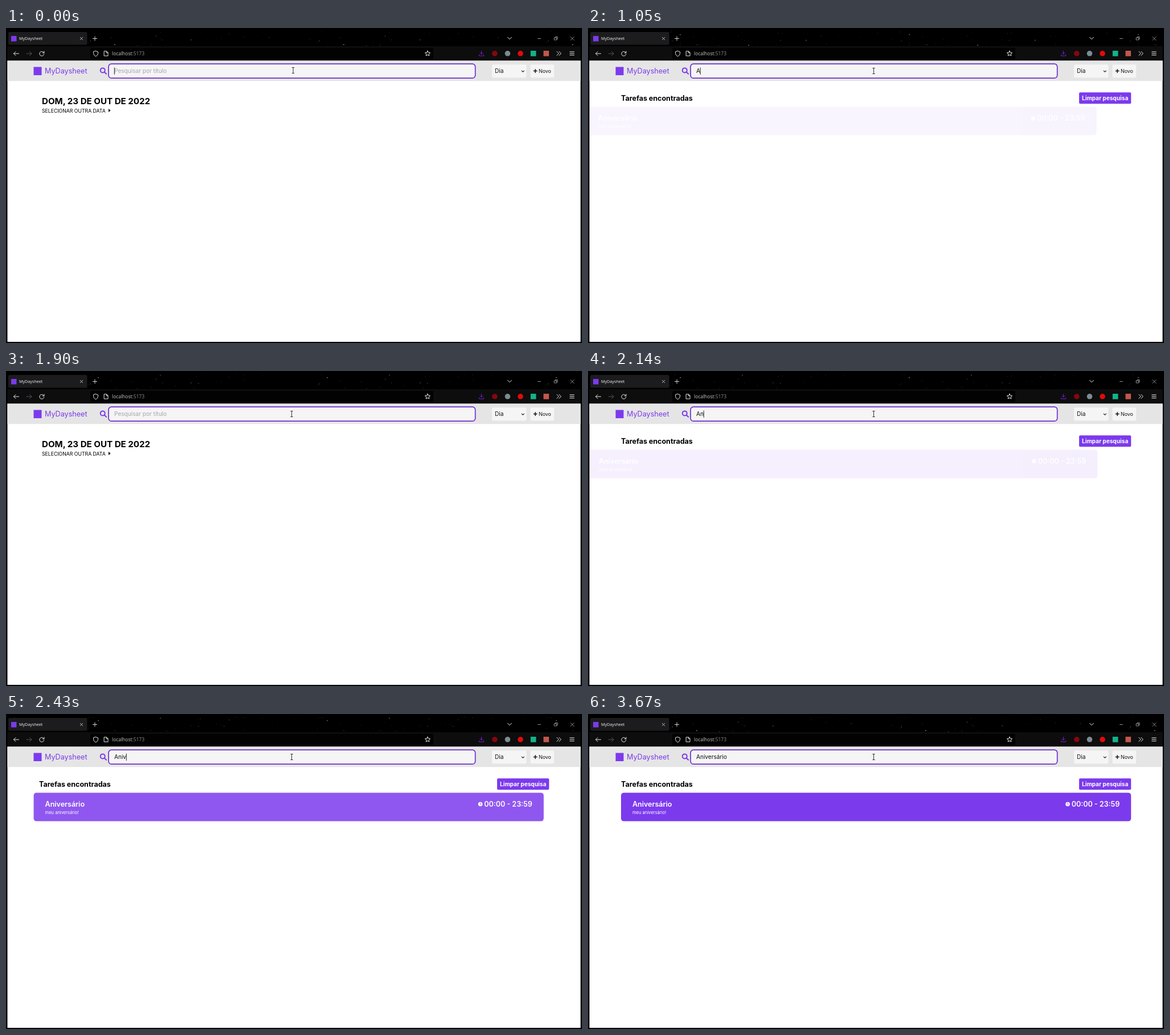
An HTML page for the animation above (3.75 s loop, 1011 px wide and 554 px high).

```html
<!DOCTYPE html>
<html lang="pt">
<head>
<meta charset="utf-8">
<title>MyDaysheet</title>
<style>
  html, body { margin: 0; width: 100%; height: 100%; overflow: hidden; background: #000; }
  svg { display: block; width: 100%; height: 100%; }
  text { font-family: Inter, sans-serif; font-size: 10.08px; white-space: pre; }
  .chrome text { font-family: "Open Sans", "Noto Sans", sans-serif; }
  .line { fill: none; stroke: #e8e8ea; stroke-linecap: round; stroke-linejoin: round; }
  .dim { stroke: #8d8d90; }
  .purple { fill: #7c3aed; }
  .field { fill: #f5f5f5; }
  .title { font-size: 12.5px; font-weight: 600; }
  .bold { font-weight: 700; }
</style>
</head>
<body>
<svg viewBox="0 0 1011 554">
  <defs>
    <clipPath id="view"><rect x="2.5" y="57.5" width="1006" height="494.5"/></clipPath>
    <path id="cross" d="M-3-3l6 6m0-6l-6 6"/>
    <path id="arrow" d="M4.5 0h-9l3.5-3.5m-3.5 3.5l3.5 3.5"/>
    <path id="chevron" d="M-3.5-1.7l3.5 3.5 3.5-3.5"/>
  </defs>

  <g class="chrome">
    <rect x="2.5" y="32" width="1006" height="26" fill="#0d0d0e"/>
    <g id="stars" fill="#fff"></g>
    <rect x="4" y="7" width="138.5" height="22.5" rx="2.5" fill="#1c1c1e"/>
    <rect class="purple" x="9" y="14" width="9.5" height="9.5"/>
    <text x="23" y="21.2" style="font-size:7.2px" fill="#f4f4f5">MyDaysheet</text>
    <rect x="148" y="35" width="602" height="19.5" rx="2.5" fill="#020203"/>
    <text x="186" y="48.2" style="font-size:8.46px" fill="#c9c9cb">localhost<tspan fill="#909094">:5173</tspan></text>

    <g class="line">
      <use href="#cross" transform="translate(132.5 18.5) scale(.75)"/>
      <use href="#cross" transform="translate(156 18.5) rotate(45) scale(.85)"/>
      <use href="#chevron" x="884" y="18"/>
      <g class="dim">
        <path d="M933.5 18.500h5M962.500 17h4v4h-4zM964 17v-1.500h4v4h-1.500"/>
        <use href="#cross" x="994" y="18.500"/>
      </g>
      <use href="#arrow" x="18" y="45"/>
      <use href="#arrow" transform="translate(40.500 45) scale(-1 1)" stroke="#57575a"/>
      <path d="M66.400 43.400a4 4 0 1 0 .4 2.400M67 41v2.800h-2.800"/>
      <path d="M157.500 40.500l4 1.500q.5 6-4 7.800-4.500-1.800-4-7.800z"/>
      <path d="M172.500 40.800h4l2.500 2.500v5.700h-6.500zM176.300 41v2.600h2.600"/>
      <path id="bookmark"/>
      <path d="M834.500 40.500v5.500m-2.500-2.500l2.500 2.500 2.500-2.500M830.500 47v2h8v-2" stroke="#7a1fd0"/>
      <use href="#chevron" transform="translate(968.500 44.800) rotate(-90)"/>
      <use href="#chevron" transform="translate(972.500 44.800) rotate(-90)"/>
      <path d="M989.700 41.800h7.500m-7.500 2.900h7.500m-7.500 2.900h7.500"/>
    </g>
    <g id="addons"></g>
  </g>

  <g clip-path="url(#view)">
    <rect width="1011" height="554" fill="#fff"/>
    <rect width="1011" height="93.2" fill="#e5e5e5"/>
    <rect class="purple" x="48.5" y="68.5" width="14" height="14.5"/>
    <text class="purple" x="68" y="80" style="font-size:12.6px">MyDaysheet</text>
    <g fill="none" stroke="#7c3aed" stroke-width="2" stroke-linecap="round">
      <circle cx="169.7" cy="74.4" r="4"/><path d="M172.8 77.500l3.300 3.300"/>
    </g>
    <rect class="field" x="180" y="63.2" width="643.7" height="25" rx="5" stroke="#6d2fd0" stroke-width="1.7"/>
    <text id="hint" x="190" y="79.3" fill="#a3a5ab">Pesquisar por título</text>
    <text id="query" x="190" y="79.3" fill="#111"></text>
    <rect id="caret" y="69.5" width=".9" height="12.5" fill="#111"/>

    <rect class="field" x="853" y="64.3" width="60.5" height="23" rx="2.5"/>
    <text x="858" y="79.4" fill="#111">Dia</text>
    <use href="#chevron" transform="translate(907.3 76) scale(.7)" fill="none" stroke="#222" stroke-width="1.7"/>
    <rect class="field" x="920.5" y="64.3" width="41.7" height="23" rx="2.5"/>
    <path d="M925.7 75.600h6.800m-3.400-3.400v6.800" stroke="#111" stroke-width="1.5"/>
    <text x="935" y="79.4" style="font-size:8.82px" fill="#111">Novo</text>

    <g id="day">
      <text class="bold" x="63" y="134" style="font-size:15.12px">DOM, 23 DE OUT DE 2022</text>
      <text x="63" y="148.5" style="font-size:8.7px">SELECIONAR OUTRA DATA</text>
      <path d="M180 142l3.500 3-3.500 3z"/>
    </g>

    <g id="results">
      <text class="title bold" x="58" y="127.6">Tarefas encontradas</text>
      <rect class="purple" x="862" y="113.3" width="91.2" height="20" rx="2"/>
      <text class="bold" x="907.6" y="127.2" text-anchor="middle" fill="#fff">Limpar pesquisa</text>
      <g id="card" fill="#fff">
        <rect class="purple" x="58" y="138.4" width="895.2" height="50.2" rx="5"/>
        <text class="title" x="78" y="162.9">Aniversário</text>
        <text x="78" y="175.5" style="font-size:7.56px">meu aniversário!</text>
        <circle cx="842" cy="158.5" r="3.8"/>
        <path d="M842 156.200v2.500l1.500 1" fill="none" stroke="#7c3aed"/>
        <text class="title" x="933.2" y="162.9" text-anchor="end">00:00 - 23:59</text>
      </g>
    </g>

    <path id="pointer" fill="none" stroke="#333" d="M-2.200-5h4.400M0-5v10M-2.200 5h4.400"/>
  </g>
</svg>
<script>
const LOOP = 3750, HOLD = LOOP / 40;
const KEY = 124, BLINK = 450;
const SLIDE = { delay: 228, duration: 480, distance: 64 };
const searches = [
  { word: "A", start: 737, end: 1400 },
  { word: "Aniversário", start: 1752, end: LOOP }
];

const $ = id => document.getElementById(id);
const clamp = x => Math.min(1, Math.max(0, x));
const ease = x => x * x * (3 - 2 * x);

function add(parent, tag, attributes) {
  const node = document.createElementNS("http://www.w3.org/2000/svg", tag);
  for (const name in attributes) node.setAttribute(name, attributes[name]);
  $(parent).append(node);
  return node;
}

const corners = Array.from({ length: 10 }, (_, i) => {
  const radius = i % 2 ? 2.3 : 4.8, angle = i * Math.PI / 5;
  return [740 + radius * Math.sin(angle), 45 - radius * Math.cos(angle)];
});
$("bookmark").setAttribute("d", `M${corners.join("L")}z`);

["#85070d", "#7d8b92", "#df0b0b", "#12b38a", "#c4574b"].forEach((fill, i) => {
  const round = i < 3;
  add("addons", "rect", { x: 853 + 22.6 * i, y: 40, width: 9.6, height: 9.6, rx: round ? 5 : 0, fill });
});

// The night sky repeats sideways; each star twinkles on its own.
const TILE = 402;
let seed = 23;
const random = () => (seed = seed * 16807 % 2147483647) / 2147483647;
const stars = [];
for (let i = 0; i < 45; i++) {
  const left = random() * TILE, y = 4 + random() * 27;
  const glow = .08 + .5 * random() ** 6;
  const phase = random() * 2 * Math.PI, cycles = 1 + Math.floor(random() * 2);
  for (let x = left; x < 1003; x += TILE)
    stars.push({ node: add("stars", "rect", { x, y, width: 1.1, height: 1.1 }), glow, phase, cycles });
}

function typing(t) {
  const search = searches.findLast(s => t >= s.start + KEY);
  if (!search) return { text: "", lastKey: 0, progress: 0 };
  if (t >= search.end) return { text: "", lastKey: search.end, progress: 0 };
  const age = t - search.start;
  const letters = Math.min(search.word.length, Math.floor(age / KEY));
  return {
    text: search.word.slice(0, letters),
    lastKey: search.start + letters * KEY,
    progress: ease(clamp((age - SLIDE.delay) / SLIDE.duration))
  };
}

function draw(t) {
  const { text, lastKey, progress } = typing(t);
  $("query").textContent = text;
  $("hint").style.display = $("day").style.display = text ? "none" : "";
  $("results").style.display = text ? "" : "none";
  $("card").setAttribute("transform", `translate(${SLIDE.distance * (progress - 1)})`);
  $("card").setAttribute("opacity", progress);
  $("caret").setAttribute("x", 189.8 + (text ? $("query").getComputedTextLength() : 0));
  $("caret").setAttribute("opacity", Math.floor((t - lastKey) / BLINK) % 2 ? 0 : 1);
  $("pointer").setAttribute("transform", t < HOLD ? "translate(504 74.5)" : "translate(501.5 75.5)");
  for (const { node, glow, phase, cycles } of stars)
    node.setAttribute("opacity", glow * (1 + Math.sin(t / LOOP * 2 * Math.PI * cycles + phase)));
}

const start = performance.now();
function frame() {
  const t = (performance.now() - start) % LOOP;
  draw(Math.floor(t / HOLD) * HOLD);
  requestAnimationFrame(frame);
}
frame();
</script>
</body>
</html>
```
